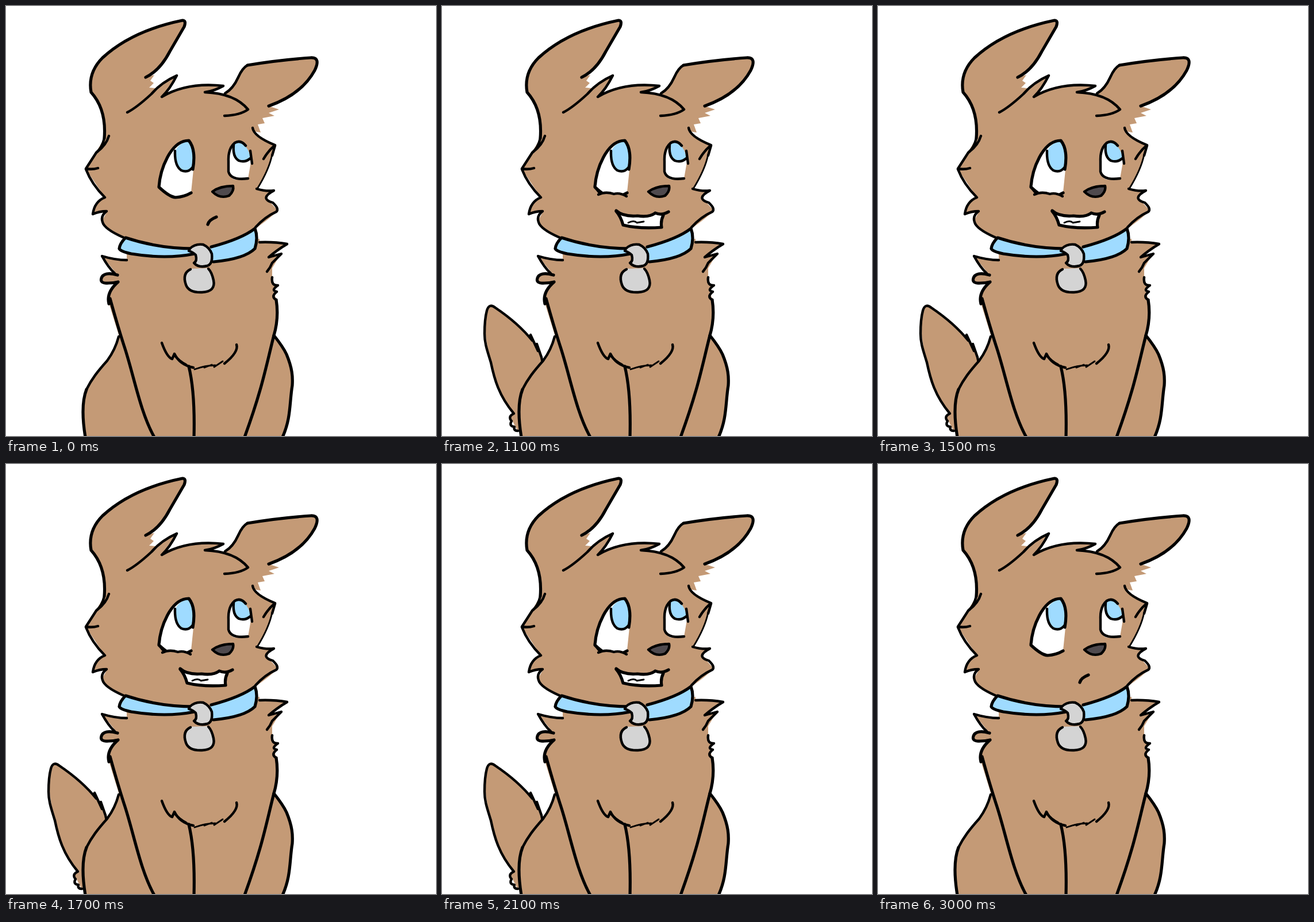
An HTML page that plays this animation: 748 by 748 pixels, repeating every 3300 ms.

```html
<!DOCTYPE html>
<html lang="en">
<head>
<meta charset="utf-8">
<title>Happy dog</title>
<style>
html, body { margin: 0; height: 100%; overflow: hidden; background: #fff; }
svg { display: block; width: 100%; height: 100%; }
path { fill: none; stroke: #000; stroke-width: 5.2; stroke-linecap: round; stroke-linejoin: round; }
.fur { fill: #c49a76; }
.blue { fill: #9fdbff; }
.grey { fill: #d4d4d4; }
.white { fill: #fff; }
.nose { fill: #4f4a4e; }
.flat { stroke: none; }
.thin { stroke-width: 4.4; }
.hair { stroke-width: 2.8; }
</style>
</head>
<body>
<svg viewBox="0 0 748 748">
  <g id="tail">
    <path class="fur flat" d="M131 738L118 713L126 708Q97 676 85 620Q70 560 77 530Q82 516 93 525Q133 550 154 578L165 590L173 611L195 690L170 740Z"/>
    <path class="thin" d="M132 739Q124 739 126 732Q116 731 121 722Q114 714 125 709C99 678 91 649 85 620C79 600 74 587 74 570Q74 545 78 530Q82 516 93 525Q133 552 157 582L154 572L167 600L165 588L173 611Q179 640 195 690"/>
  </g>

  <g id="body">
    <path class="fur flat" d="M210 425L320 425L441 405V411Q465 410 490 414L457 437L478 431L463 456V485L473 486L465 495L470 510Q475 540 466 573C486 602 499 628 498 660C495 700 494 715 482 752H138Q126 700 140 665Q150 643 174 620Q190 600 197 575L179 517Q178 498 196 480Q160 486 166 472Q174 462 194 468L167 435L210 443Z"/>
    <path class="thin" d="M210 442Q190 442 167 435Q178 455 189 465"/>
    <path d="M194 468Q173 462 167 471Q161 483 178 482Q187 482 195 480Q174 498 179 518"/>
    <path d="M181 509Q194 556 205 590C222 640 233 706 258 750"/>
    <path class="thin" d="M196 575Q190 598 176 617C159 636 149 649 140 667"/>
    <path d="M140 667Q129 695 138 750"/>
    <path class="thin" d="M441 411Q466 410 489 414Q472 424 457 437L479 431L463 447Q460 455 454 462"/>
    <path class="thin" d="M463 472Q461 487 473 486Q460 495 471 497Q460 506 470 511"/>
    <path d="M470 511Q475 542 466 573C452 628 446 665 415 750"/>
    <path d="M466 573Q482 593 488 606C498 630 499 645 498 660C493 690 496 717 481 750"/>
    <path d="M318 627Q329 672 327 750"/>
    <path class="thin" d="M271 586Q280 611 289 614L293 605Q302 624 326 629M293 607Q300 617 313 624"/>
    <path class="hair" d="M328 632Q347 625 364 625M345 629L358 624M362 628L377 618"/>
    <path class="thin" d="M380 622Q405 602 401 589"/>
  </g>

  <g id="head">
    <path class="fur flat" d="M171 230Q175 180 148 150Q145 112 168 90Q220 43 311 26Q313 36 285 79Q269 112 243 124L258 120L251 130L257 134L249 142L262 143L297 121L271 158Q315 132 378 139L348 150L381 153Q396 141 417 103L535 90Q548 92 525 130Q495 161 457 174L475 180L457 186L467 191L446 195L450 204L438 206L443 220L430 218Q438 229 468 242Q459 282 437 318L466 321L452 333L472 355Q468 363 434 387L425 408L340 426Q265 424 205 403Q166 387 168 372L176 357L151 362Q154 343 172 333L139 284Z"/>
    <path d="M171 230Q175 180 148 150Q142 116 168 90Q219 43 307 25Q314 25 310 36L285 79Q268 112 243 124"/>
    <path class="thin" d="M179 226Q174 243 157 255M171 230Q167 247 157 255L139 283Q150 285 160 282M139 284Q149 310 172 333Q154 340 151 362Q162 357 175 357Q164 365 168 376Q171 388 205 403"/>
    <path class="thin" d="M211 185Q227 177 253 153Q270 133 297 121Q285 145 271 158Q315 132 378 139Q362 148 346 150Q398 152 421 180Q407 190 380 191"/>
    <path class="thin" d="M381 152Q395 144 404 124Q411 108 420 103"/>
    <path d="M420 103Q473 94 530 90Q548 89 537 112C520 143 491 162 457 174"/>
    <path class="thin" d="M429 212Q431 227 468 242Q456 252 448 266M468 243L463 260"/>
    <path class="hair" d="M463 258Q458 284 437 318"/>
    <path class="thin" d="M436 318Q452 323 466 321Q440 335 464 342Q476 353 470 358Q450 367 434 385"/>
  </g>

  <g id="eyes">
    <path class="white flat" d="M318 234C285 235 269 285 266 315Q278 331 296 333L322 324L326 285L327 258Z"/>
    <path class="blue flat" d="M318 234Q292 242 294 262Q298 289 310 289Q323 288 327 272Q326 239 318 234Z"/>
    <path d="M325 284Q331 250 318 234C286 234 268 285 266 315Q284 332 295 333Q310 332 322 325"/>
    <path class="thin" d="M294 252Q293 278 305 286Q317 291 325 280"/>
    <path class="white flat" d="M400 236Q381 252 386 279Q388 302 400 302L421 300L427 266Q419 239 400 236Z"/>
    <path class="blue flat" d="M400 236Q390 250 400 265Q410 275 425 264Q421 239 400 236Z"/>
    <path class="thin" d="M428 274L425 252M417 243Q408 232 398 238Q386 248 387 270V288Q391 304 421 300"/>
    <path class="thin" d="M396 242Q394 263 405 269Q416 273 425 265"/>
    <path class="nose thin" d="M359 323Q372 313 395 313Q397 322 388 330Q372 336 359 323Z"/>
  </g>

  <g id="collar">
    <path class="blue" d="M328 422Q265 422 208 403Q198 413 197 422Q199 427 218 431Q278 441 328 431"/>
    <path class="blue flat" d="M355 419Q410 405 433 387Q439 403 433 422Q415 440 361 445Z"/>
    <path d="M357 419Q410 405 433 387Q439 403 433 422Q415 440 361 445"/>
    <path class="grey flat" d="M323 457Q306 469 313 485Q318 500 341 498Q363 498 361 480L352 456Z"/>
    <path class="thin" d="M321 458Q306 465 313 485Q318 499 341 498Q365 497 361 477Q358 463 352 457"/>
    <path class="grey thin" d="M320 422Q329 413 343 415Q354 420 358 431Q360 449 350 452Q335 456 327 447Q333 444 330 433Q325 428 318 426Z"/>
  </g>

  <path class="mouth" data-mood="frown" d="M351 380Q353 372 366 367"/>
  <path class="mouth thin" data-mood="calm" d="M349 373Q357 373 362 370Q367 363 372 368L382 367"/>
  <path class="mouth thin" data-mood="smile" d="M320 366Q332 365 340 369Q360 376 368 366Q386 369 393 360"/>
  <g class="mouth" data-mood="grin">
    <path class="fur flat" d="M262 326L285 324L300 326L326 331V339H262Z"/>
    <path class="thin" d="M266 315L274 325M272 328Q284 322 299 327Q309 324 321 331"/>
    <path class="white flat" d="M304 358Q313 366 359 365L371 360L384 363L381 385Q340 387 316 382Z"/>
    <path d="M303 356Q315 367 340 365Q361 368 371 360Q382 365 394 358M303 357Q311 366 315 381Q343 388 382 385Q380 374 385 364"/>
    <path class="hair" d="M324 377Q334 372 339 377L351 375"/>
  </g>
</svg>
<script>
const LOOP = 3300, STEP = 100, WAG_START = 900, WAG_END = 2400;
const moods = [[0, "frown"], [700, "calm"], [800, "smile"], [WAG_START, "grin"],
  [WAG_END, "smile"], [2700, "calm"], [3000, "frown"]];
const tail = document.getElementById("tail");
const mouths = document.querySelectorAll(".mouth");

function draw(now) {
  const t = now % LOOP;
  const mood = moods.findLast(([start]) => t >= start)[1];
  for (const m of mouths) m.style.display = m.dataset.mood === mood ? "" : "none";

  // The tail flips between two poses while the dog grins.
  const swing = Math.floor((t - WAG_START) / STEP) % 2;
  tail.style.display = mood === "grin" ? "" : "none";
  tail.setAttribute("transform", `rotate(${swing * -14} 150 700)`);
  requestAnimationFrame(() => draw(performance.now() - origin));
}
const origin = performance.now();
draw(0);
</script>
</body>
</html>
```
